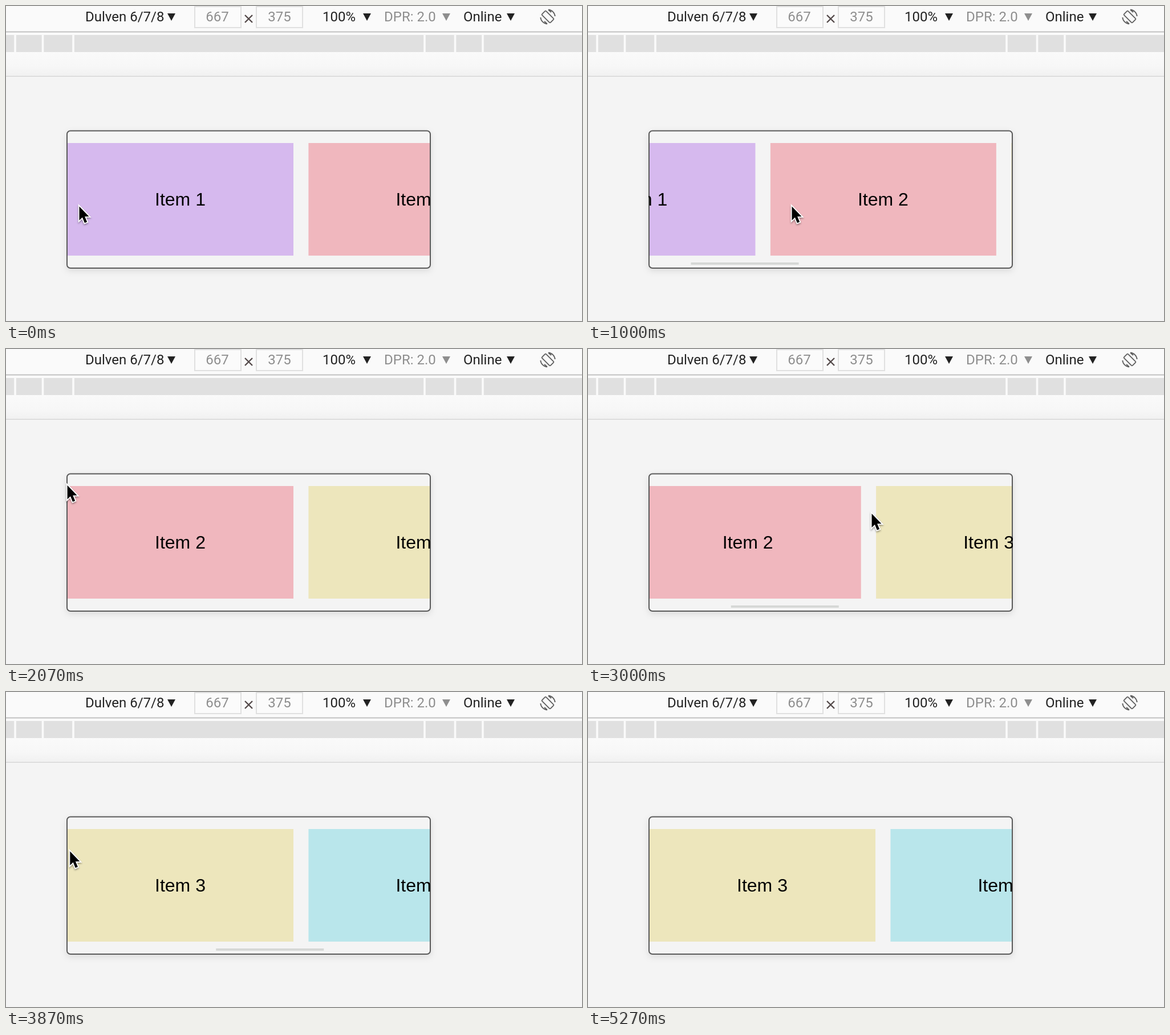
An HTML page for the animation above (5.34 s loop, 1010x554 px).

```html
<!DOCTYPE html>
<html lang="en">
<head>
<meta charset="utf-8">
<title>Scroll snapping</title>
<style>
  html, body { margin: 0; width: 100%; height: 100%; overflow: hidden; background: #f4f4f4; }
  svg { display: block; width: 1010px; height: 554px; }
  .bar text { font: 24px Roboto, "Open Sans", sans-serif; fill: #222; }
  .bar .dim { fill: #8e8e8e; }
  .mid { text-anchor: middle; }
  #labels text { font: 32px "Liberation Sans", Arial, sans-serif; text-anchor: middle; }
  #frame { filter: drop-shadow(0 4px 6px rgba(0, 0, 0, .1)); }
  #cursor { filter: drop-shadow(0 2px 1.5px rgba(0, 0, 0, .35)); }
</style>
</head>
<body>
<svg viewBox="0 0 1010 554">
  <defs>
    <linearGradient id="fade" x2="0" y2="1">
      <stop stop-color="#fafafa"/><stop offset=".6" stop-color="#f7f7f7"/><stop offset="1" stop-color="#f1f1f1"/>
    </linearGradient>
    <clipPath id="inner"><rect x="108" y="220" width="635" height="240"/></clipPath>
    <clipPath id="outer"><rect x="106" y="218" width="639" height="244"/></clipPath>
    <path id="down" d="M0 0h14l-7 13z"/>
  </defs>

  <rect width="1010" height="554" fill="#f4f4f4"/>
  <g class="bar">
    <rect width="1010" height="81" fill="#fafafa"/>
    <rect y="44.5" width="1010" height="2" fill="#c2c2c2"/>
    <rect y="51" width="1010" height="30" fill="#e0e0e0"/>
    <g id="gaps" fill="#fafafa"></g>
    <rect y="81" width="1010" height="42" fill="url(#fade)"/>
    <rect y="123" width="1010" height="1.2" fill="#d0d0d0"/>
    <g fill="#fbfbfb" stroke="#e0e0e0" stroke-width="2">
      <rect x="331" y="1" width="81" height="37"/>
      <rect x="439" y="1" width="81" height="37"/>
    </g>
    <text x="139" y="27">Dulven 6/7/8</text>
    <text class="dim mid" x="370.5" y="27">667</text>
    <text class="dim mid" x="479.5" y="27">375</text>
    <path d="M419 16l13 13m0-13l-13 13" stroke="#544a4a" stroke-width="2.4"/>
    <text x="555" y="27">100%</text>
    <text class="dim" x="663" y="27">DPR: 2.0</text>
    <text x="802" y="27">Online</text>
    <g fill="#222">
      <use href="#down" x="283" y="13"/>
      <use href="#down" x="626" y="13"/>
      <use href="#down" x="765" y="13" fill="#8e8e8e"/>
      <use href="#down" x="878" y="13"/>
    </g>
    <g transform="translate(950 19)" fill="none" stroke="#5e5e5e" stroke-width="1.8">
      <rect x="-5" y="-10.5" width="10" height="21" rx="1.5" transform="rotate(-45)"/>
      <path id="turn" d="M1-12.5A12.6 12.6 0 0 1 12.7-1M1-12.5l5 4.5"/>
      <use href="#turn" transform="rotate(180)"/>
    </g>
  </g>

  <rect id="frame" x="107" y="219.5" width="637" height="241.5" rx="6" fill="#f4f4f4" stroke="#5a5a5a" stroke-width="2"/>
  <g clip-path="url(#inner)"><g id="cards"></g></g>
  <g clip-path="url(#outer)"><g id="labels"></g></g>
  <rect id="thumb" y="451" width="189" height="4" fill="#d6d8d6"/>
  <path id="cursor" d="M0 0V24.5L5.4 19.3 9.4 29 13.6 27.2 9.6 17.8H17Z" stroke="#fff" stroke-width="3.6" paint-order="stroke"/>
</svg>
<script>
const LOOP = 5340, STEP = 200 / 3, PITCH = 422.4, SNAP = 477;
const SWIPES = [762, 2929];
const $ = id => document.getElementById(id);

function add(parent, tag, attrs, text = '') {
  const el = document.createElementNS('http://www.w3.org/2000/svg', tag);
  for (const key in attrs) el.setAttribute(key, attrs[key]);
  el.textContent = text;
  parent.append(el);
}

// The device widths mirror around the middle of the ruler
for (const half of [308, 361.5, 410])
  for (const side of [-1, 1])
    add($('gaps'), 'rect', { x: 424.2 + side * half, y: 51, width: 3.6, height: 30 });

['#d6b9ee', '#f0b7be', '#ede6bc', '#b9e6eb'].forEach((fill, i) => {
  const x = 108 + i * PITCH;
  add($('cards'), 'rect', { x, y: 241, width: 396, height: 198, fill });
  add($('labels'), 'text', { x: x + 197.5, y: 351 }, `Item ${i + 1}`);
});

// Smooth 0 to 1 between two times
function ease(t, from, to) {
  const u = Math.min(1, Math.max(0, (t - from) / (to - from)));
  return u * u * (3 - 2 * u);
}

const scrollAt = t => PITCH * SWIPES.reduce((sum, at) => sum + ease(t, at, at + SNAP), 0);

// The scroll bar shows during a swipe and lingers for a while
const shown = (t, from, to) => ease(t, from - 40, from + 40) - ease(t, to, to + 250);
const thumbAlpha = t => shown(t, SWIPES[0], 1500) + shown(t, SWIPES[1], 4200);

// Pointer moves: start, end, target x, target y
const MOVES = [
  [0, 200, 72, 350],
  [200, 680, 356, 350],
  [1570, 2280, 37, 206],
  [2280, 2740, 496, 287],
  [3425, 3960, 77, 277],
  [4200, 4470, 779, 501],
  [4610, 5000, 878, 562]
];
const pointerAt = t => MOVES.reduce(([x, y], [from, to, tx, ty]) => {
  const k = ease(t, from, to);
  return [x + (tx - x) * k, y + (ty - y) * k];
}, [127, 350]);

function draw(now) {
  const n = Math.min(79, Math.floor((now % LOOP + 4) / STEP));
  const t = n * STEP, s = scrollAt(t), [x, y] = pointerAt(t);
  for (const id of ['cards', 'labels']) $(id).setAttribute('transform', `translate(${-s})`);
  $('thumb').setAttribute('x', 118.2 + s * .296);
  $('thumb').setAttribute('opacity', thumbAlpha(t));
  $('cursor').setAttribute('transform', `translate(${x + 1.5} ${y + 2.5})`);
}

const start = performance.now();
function tick() {
  draw(performance.now() - start);
  requestAnimationFrame(tick);
}
tick();
</script>
</body>
</html>
```
